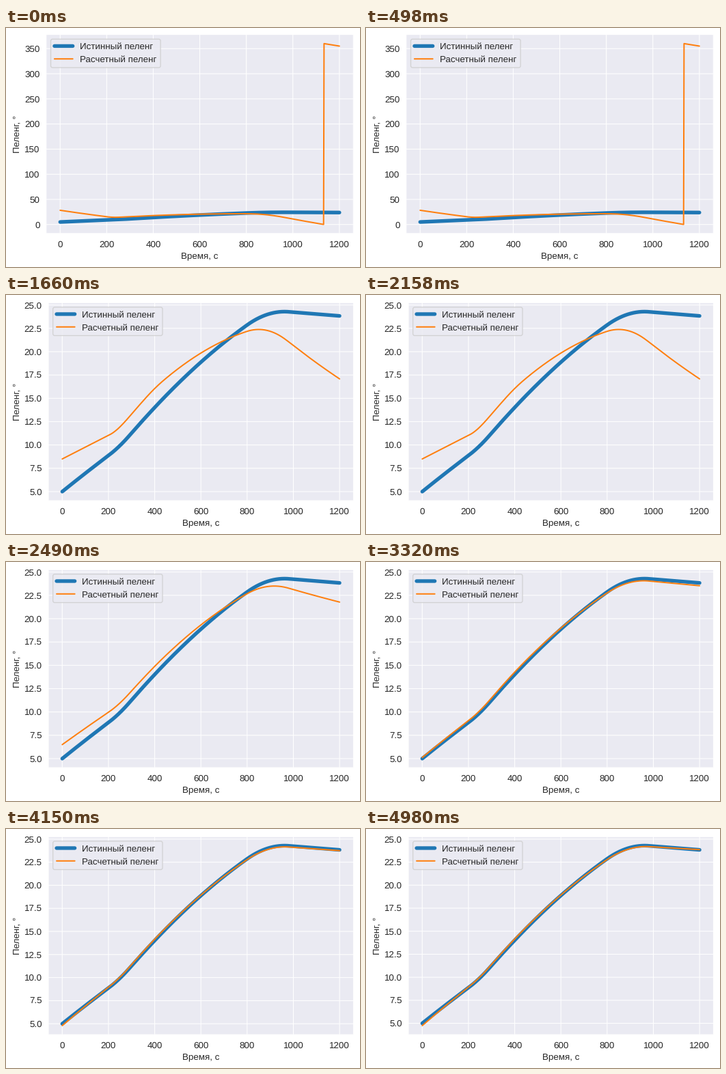
A matplotlib script for the animation above (5.81 s loop, 518 by 350 pixels).

```python
import numpy as np
import matplotlib.pyplot as plt
from matplotlib.animation import FuncAnimation
from matplotlib.ticker import MultipleLocator, FormatStrFormatter

W, H = 518, 350
INK, PANEL = "0.15", "#EAEAF2"
BLUE, ORANGE = "#1f77b4", "#ff7f0e"

plt.rcParams.update({
    "font.family": "Liberation Sans",
    "text.hinting": "none",
    "path.snap": False,
})

TIME = np.linspace(0, 1200, 601)

# Leg boundaries of the error and how its rate drifts along each leg
LEGS = [0, 200, 250, 360, 440, 800, 960, 1200]
DRIFT = np.array([1.07, 0.93, 1, 1, 0.65, 1.35, 1.1, 0.9])


def integrate(start, times, rates):
    """Bearing whose rate, in degrees per 100 s, is linear between times."""
    rate = np.interp(TIME, times, rates) / 100
    steps = (rate[1:] + rate[:-1]) / 2 * np.diff(TIME)
    return start + np.concatenate([[0], np.cumsum(steps)])


def estimate(start, *leg_rates):
    error = integrate(start, LEGS, DRIFT * np.repeat(leg_rates, 2))
    return (true_bearing + error) % 360


true_bearing = integrate(5, [0, 200, 290, 400, 800, 980, 1200],
                         [2.0, 1.87, 2.85, 2.65, 1.77, -0.2, -0.2])

# Initial error, then its rate on each of the four legs
estimates = [
    estimate(23.3, -8.33, -0.5, -1.36, -7.9),
    estimate(9.7, -3.34, 0.2, -0.97, -3.66),
    estimate(3.5, -0.675, 0.05, -0.715, -1.615),
    estimate(1.5, -0.2, -0.1, -0.275, -0.48),
    estimate(0.12, 0.04, 0.03, -0.094, -0.03),
    estimate(-0.2, 0.14, 0.02, -0.06, 0.02),
    estimate(-0.25, 0.155, 0.03, -0.06, 0.053),
]

fig = plt.figure(figsize=(W / 100, H / 100), dpi=100, facecolor="white")
ax = fig.add_axes([0.1, 0.1, 0.8, 0.8])


def place(left, top, right, bottom):
    ax.set_position([left / W, 1 - bottom / H,
                     (right - left) / W, (bottom - top) / H])


def draw(n):
    wide = n == 0
    k = 0.966 if wide else 0.96
    size = 10 * k
    ax.clear()
    if wide:
        place(58.8, 9.6, 508.3, 300.9)
    else:
        place(62.0, 11.2, 508.4, 301.1)

    ax.set_facecolor(PANEL)
    ax.set_axisbelow(True)
    ax.grid(True, color="white", lw=0.8 * k, ls="-")
    for spine in ax.spines.values():
        spine.set(color="white", linewidth=0.8 * k)

    ax.plot(TIME, true_bearing, color=BLUE, lw=4 * k,
            solid_capstyle="round", label="Истинный пеленг")
    ax.plot(TIME, estimates[n], color=ORANGE, lw=1.5 * k,
            solid_capstyle="round", label="Расчетный пеленг")

    ax.xaxis.set_major_locator(MultipleLocator(200))
    ax.yaxis.set_major_locator(MultipleLocator(50 if wide else 2.5))
    ax.yaxis.set_major_formatter(FormatStrFormatter("%d" if wide else "%.1f"))
    ax.tick_params(length=0, pad=7 * k, labelsize=size, labelcolor=INK)
    ax.tick_params(axis="x", pad=7.6 * k)
    ax.set_xlabel("Время, с", size=size, color=INK, labelpad=4 * k)
    ax.set_ylabel("Пеленг, °", size=size, color=INK, labelpad=3.4 * k)

    legend = ax.legend(loc="upper left", fontsize=size, labelcolor=INK,
                       facecolor=PANEL, edgecolor="0.8", framealpha=0.8)
    legend.get_frame().set_linewidth(k)
    return ax.lines


anim = FuncAnimation(fig, draw, frames=len(estimates), interval=830,
                     init_func=lambda: draw(0), repeat=True, repeat_delay=0,
                     blit=False)
plt.show()
```
